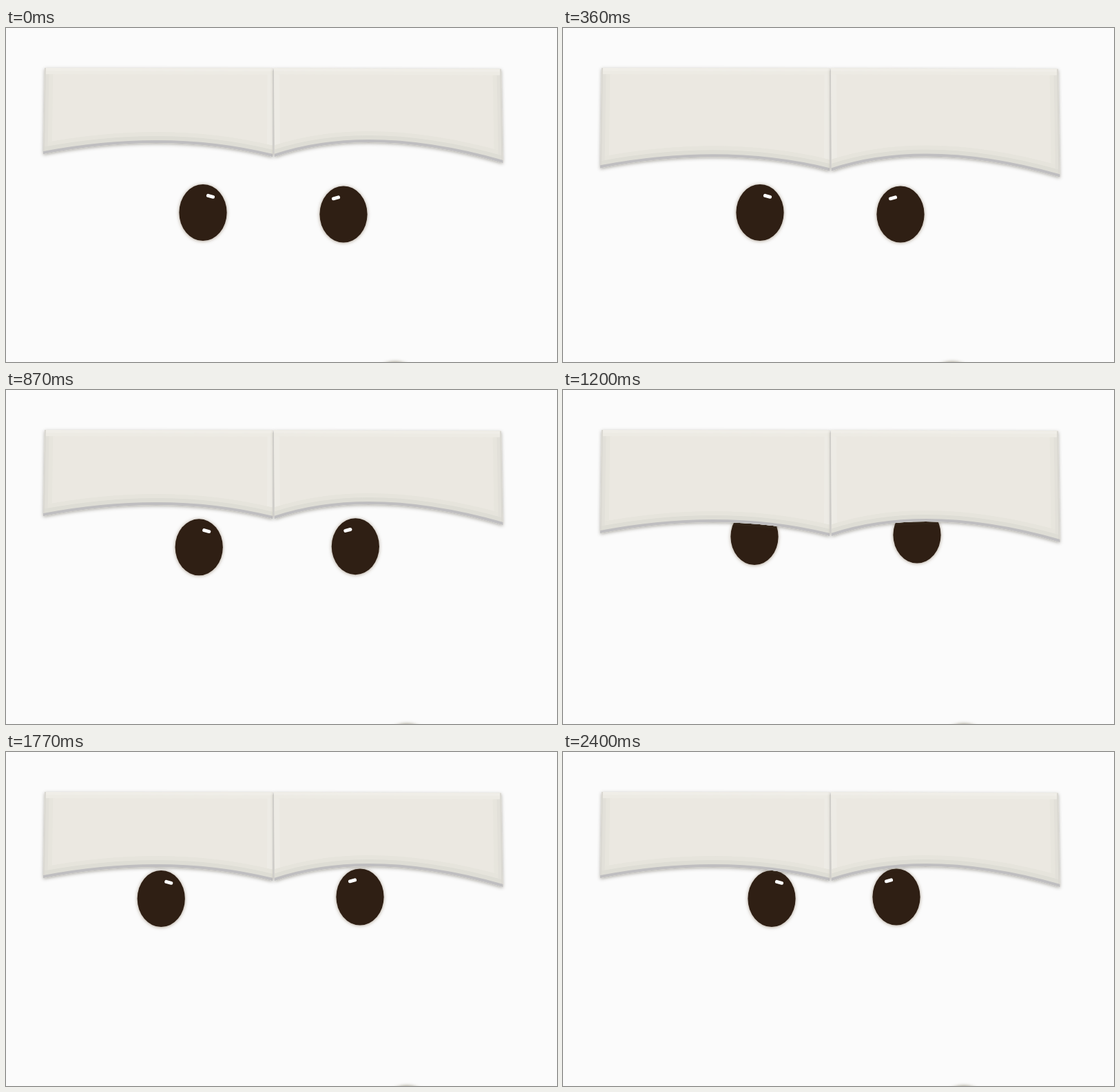
An HTML page with a canvas for the animation above (3 s loop, 800 by 485 pixels).

```html
<!DOCTYPE html>
<html lang="en">
<head>
<meta charset="utf-8">
<title>Shifty eyes</title>
<style>
html, body { margin: 0; width: 100%; height: 100%; overflow: hidden; background: #fbfbfb; }
canvas { display: block; }
</style>
</head>
<body>
<canvas id="stage" width="800" height="485"></canvas>
<script>
const ctx = document.getElementById('stage').getContext('2d');
const LOOP = 3000, STEP = 30;
const DARK = '#2f1f14';

const smooth = p => p * p * (3 - 2 * p);

// Eased value at time t through keys of [time, value].
function track(t, keys) {
  if (t <= keys[0][0]) return keys[0][1];
  for (let i = 1; i < keys.length; i++) {
    const [t0, v0] = keys[i - 1], [t1, v1] = keys[i];
    if (t < t1) return v0 + (v1 - v0) * smooth((t - t0) / (t1 - t0));
  }
  return keys[keys.length - 1][1];
}

function withShadow(color, blur, dy, draw) {
  ctx.save();
  ctx.shadowColor = color;
  ctx.shadowBlur = blur;
  ctx.shadowOffsetY = dy;
  draw();
  ctx.restore();
}

function oval(x, y, rx, ry) {
  ctx.beginPath();
  ctx.ellipse(x, y, rx, ry, 0, 0, Math.PI * 2);
  ctx.fillStyle = DARK;
  ctx.fill();
}

function eye(x, y, side) {
  withShadow('rgba(90,65,35,.5)', 5, 0.5, () => oval(x, y, 34.6, 41));
  ctx.save();
  ctx.translate(x - side * 11, y - 23.7);
  ctx.rotate(-side * 0.27);
  ctx.beginPath();
  ctx.moveTo(-3.7, 0);
  ctx.lineTo(3.7, 0);
  ctx.strokeStyle = '#fff';
  ctx.lineWidth = 5;
  ctx.lineCap = 'round';
  ctx.stroke();
  ctx.restore();
}

function brow({ tl, tr, br, ctrl, bl, sides }, drop) {
  const [blx, bly] = [bl[0], bl[1] + drop];
  const [brx, bry] = [br[0], br[1] + drop];
  const bottom = new Path2D();
  bottom.moveTo(brx, bry);
  bottom.quadraticCurveTo(ctrl[0], ctrl[1] + drop, blx, bly);
  const shape = new Path2D();
  shape.moveTo(...tl);
  shape.lineTo(...tr);
  shape.lineTo(brx, bry);
  shape.quadraticCurveTo(ctrl[0], ctrl[1] + drop, blx, bly);
  shape.closePath();
  const line = (a, b) => {
    const p = new Path2D();
    p.moveTo(...a);
    p.lineTo(...b);
    return p;
  };
  const left = line(tl, [blx, bly]), right = line(tr, [brx, bry]), top = line(tl, tr);
  const stroke = (path, color, width) => {
    ctx.strokeStyle = color;
    ctx.lineWidth = width;
    ctx.stroke(path);
  };

  ctx.fillStyle = '#ebe8e1';
  withShadow('rgba(70,65,50,.42)', 5, 1.5, () => ctx.fill(shape));
  ctx.save();
  ctx.clip(shape);
  const outer = sides === 'left' ? left : right;
  const inner = sides === 'left' ? right : left;
  stroke(inner, '#edebe5', 16);
  stroke(outer, '#e7e5dd', 25);
  stroke(bottom, '#e6e4dc', 32);
  stroke(outer, '#e2e0d9', 13);
  stroke(bottom, '#deddd5', 20);
  stroke(top, '#edebe4', 18);
  stroke(top, '#f0eee8', 8);
  stroke(outer, '#dad8d2', 4);
  stroke(bottom, '#bfbec0', 8);
  ctx.restore();
}

const LEFT_BROW = { tl: [56, 58], tr: [387.5, 58.5], br: [387, 187], ctrl: [234, 149], bl: [54, 183], sides: 'left' };
const RIGHT_BROW = { tl: [389, 58.5], tr: [719, 59.5], br: [721.5, 196], ctrl: [528, 141], bl: [390, 187], sides: 'right' };

function draw(t) {
  const rise = track(t, [[550, 0], [1040, 1]]);
  const drop = track(t, [[0, 0], [270, 27], [550, 0], [1050, 0], [1230, 27], [1440, 0]]);
  const lookLeft = track(t, [[1595, 0], [1800, -56], [2010, 24], [2200, 25]]);
  const lookRight = track(t, [[2015, 0], [2215, 31], [2400, -30]]);
  const mouthX = track(t, [[450, 565], [840, 582]]);

  ctx.fillStyle = '#fbfbfb';
  ctx.fillRect(0, 0, 800, 485);
  withShadow('rgba(80,70,35,.65)', 5, 0, () => oval(mouthX, 526, 40, 41));
  eye(286 - 8 * rise + lookLeft, 268 - 55 * rise, -1);
  eye(490 + 24 * rise + lookRight, 270.5 - 60 * rise, 1);

  brow(LEFT_BROW, drop);
  brow(RIGHT_BROW, drop);
  ctx.fillStyle = '#cfcdc9';
  ctx.fillRect(387.3, 62, 1.7, 123 + drop);
}

function frame() {
  const t = performance.now() % LOOP;
  draw(Math.floor(t / STEP) * STEP);
  requestAnimationFrame(frame);
}
frame();
</script>
</body>
</html>
```
